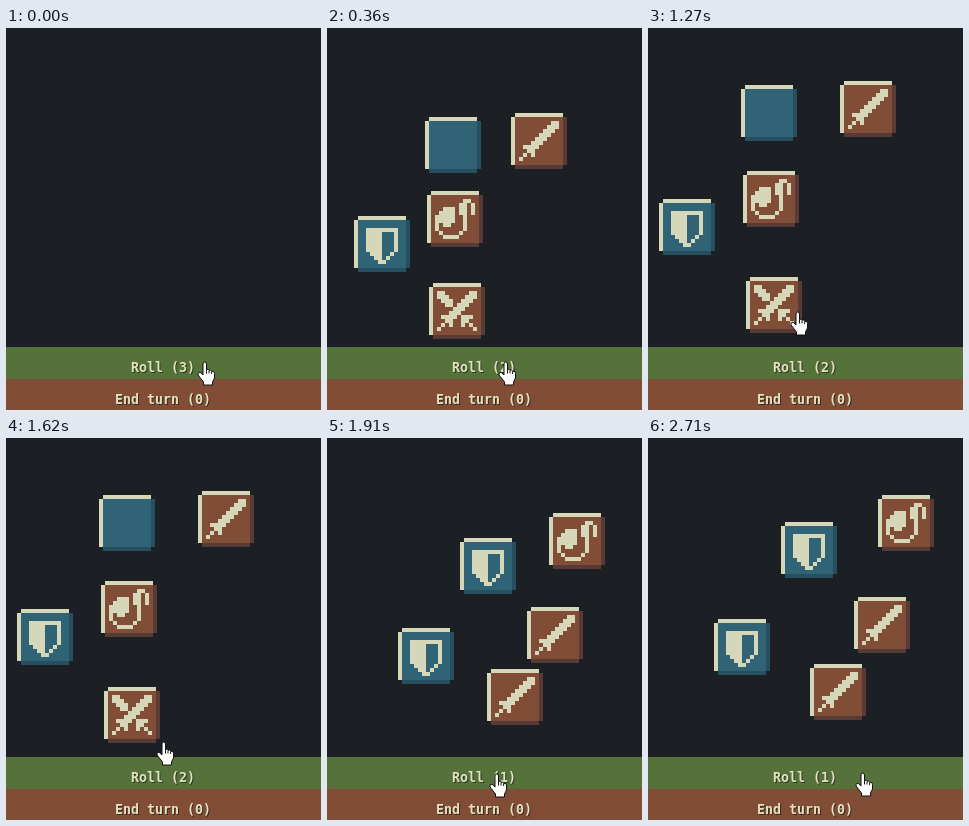
An HTML page with a canvas that plays this animation: 315 by 382 pixels, repeating every 3030 ms.

```html
<!DOCTYPE html>
<html lang="en">
<head>
<meta charset="utf-8">
<title>Dice roll</title>
<style>
  html, body { margin: 0; width: 100%; height: 100%; overflow: hidden; background: #1c1f24; }
  canvas { display: block; }
</style>
</head>
<body>
<canvas id="stage" width="315" height="382"></canvas>
<script>
const ctx = document.getElementById('stage').getContext('2d');
const LOOP = 3030, CELL = 4, SPEED = 0.014;
const SPAWN = [130, 295];
const CREAM = '#d6d7b8', TEXT = '#e2e1be', BG = '#1c1f24', GREEN = '#56723b', RED = '#814d37';
const RED_DIE = [RED, '#583a37'], BLUE_DIE = ['#316377', '#264f60'];

// Icons on the 12 x 12 cell face of a die
const ICONS = {
  blank: [],
  sword: [
    '',
    '.........##.',
    '........###.',
    '.......###..',
    '......###...',
    '.....###....',
    '....###.....',
    '..####......',
    '...##.......',
    '..#.#.......',
    '.#..........'],
  cross: [
    '',
    '.##......##.',
    '.###....###.',
    '..###..###..',
    '...##.###...',
    '.....###....',
    '....###.....',
    '..####.###..',
    '...##..##...',
    '..#.#..#.#..',
    '.#........#.'],
  bomb: [
    '',
    '........##..',
    '.......##.#.',
    '...###.##.#.',
    '..####.##.#.',
    '.#####..#...',
    '.#####..#...',
    '.#.##...#...',
    '.#......#...',
    '..#....#....',
    '...####.....'],
  shield: [
    '', '',
    '..########..',
    ...Array(5).fill('..####...#..'),
    '...###..#...',
    '....##.#....',
    '.....##.....']
};

// Each roll: start time, then dice with icon, colours and resting place
const ROLLS = [
  { start: 217, dice: [
    ['blank', BLUE_DIE, 93, 57],
    ['sword', RED_DIE, 192, 53],
    ['bomb', RED_DIE, 95, 143],
    ['shield', BLUE_DIE, 11, 171],
    ['cross', RED_DIE, 98, 249]] },
  { start: 1726, dice: [
    ['bomb', RED_DIE, 230, 57],
    ['sword', RED_DIE, 206, 159],
    ['shield', BLUE_DIE, 133, 84],
    ['shield', BLUE_DIE, 66, 181],
    ['sword', RED_DIE, 162, 226]] }
];

// Pointer path: time, x, y
const PATH = [
  [0, 191, 334], [30, 191, 334], [190, 171, 334], [540, 171, 334],
  [680, 180, 334], [1050, 180, 334], [1110, 176, 341], [1270, 142, 284],
  [1390, 143, 278], [1580, 143, 278], [1680, 160, 341], [1740, 162, 336],
  [2170, 162, 336], [2250, 173, 335], [2420, 195, 335], [2620, 195, 335],
  [2710, 207, 335], [LOOP, 207, 335]
];

const HAND = new Path2D('M6 2.5Q6 .5 7.7 .5T9.5 2.5V8Q11.2 7 12 8.8Q13.8 8 14.7 9.7' +
  'Q17.5 9.3 17.5 12V16.5L15.5 20.5V23.5H6.5V20.5L1 13.5Q.3 10.5 3 10.7L6 13.5Z');
const KNUCKLES = new Path2D('M9.5 8V12M12 9V12M14.6 10V12.5');

function rect(color, x, y, w, h) {
  ctx.fillStyle = color;
  ctx.fillRect(x, y, w, h);
}

function button(color, label, y, h) {
  rect(color, 0, y, 315, h);
  ctx.font = 'bold 13.3px "DejaVu Sans Mono", monospace';
  ctx.textAlign = 'center';
  ctx.fillStyle = 'rgba(20,20,20,.6)';
  ctx.fillText(label, 158, y + 26);
  ctx.fillStyle = TEXT;
  ctx.fillText(label, 157, y + 25);
}

function die(icon, [face, shade], x, y) {
  rect(shade, x + 52, y + 4, 4, 48);
  rect(shade, x + 4, y + 52, 48, 4);
  rect(face, x + 4, y + 4, 48, 48);
  rect(CREAM, x + 4, y, 48, 4);
  rect(CREAM, x, y + 4, 4, 48);
  ICONS[icon].forEach((row, r) => [...row].forEach((c, i) => {
    if (c === '#') rect(CREAM, x + 4 + i * CELL, y + 4 + r * CELL, CELL, CELL);
  }));
}

function pointer(t) {
  const i = PATH.findIndex(p => p[0] > t);
  const [t0, x0, y0] = PATH[i - 1], [t1, x1, y1] = PATH[i];
  const u = (t - t0) / (t1 - t0);
  ctx.save();
  ctx.translate(Math.round(x0 + (x1 - x0) * u), Math.round(y0 + (y1 - y0) * u) - 0.5);
  ctx.fillStyle = '#fff';
  ctx.strokeStyle = '#111';
  ctx.lineWidth = 1;
  ctx.fill(HAND);
  ctx.stroke(HAND);
  ctx.stroke(KNUCKLES);
  ctx.restore();
}

function draw(t) {
  const done = ROLLS.filter(r => t >= r.start);
  rect(BG, 0, 0, 315, 382);
  button(GREEN, `Roll (${3 - done.length})`, 319, 32);
  button(RED, 'End turn (0)', 351, 31);
  if (done.length) {
    const { start, dice } = done[done.length - 1];
    const left = Math.exp(-SPEED * (t - start));
    const glide = (from, to) => Math.round(to + (from - to) * left);
    for (const [icon, colors, x, y] of dice)
      die(icon, colors, glide(SPAWN[0], x), glide(SPAWN[1], y));
  }
  pointer(t);
}

const begin = performance.now();
function tick() {
  draw((performance.now() - begin) % LOOP);
  requestAnimationFrame(tick);
}
tick();
</script>
</body>
</html>
```
